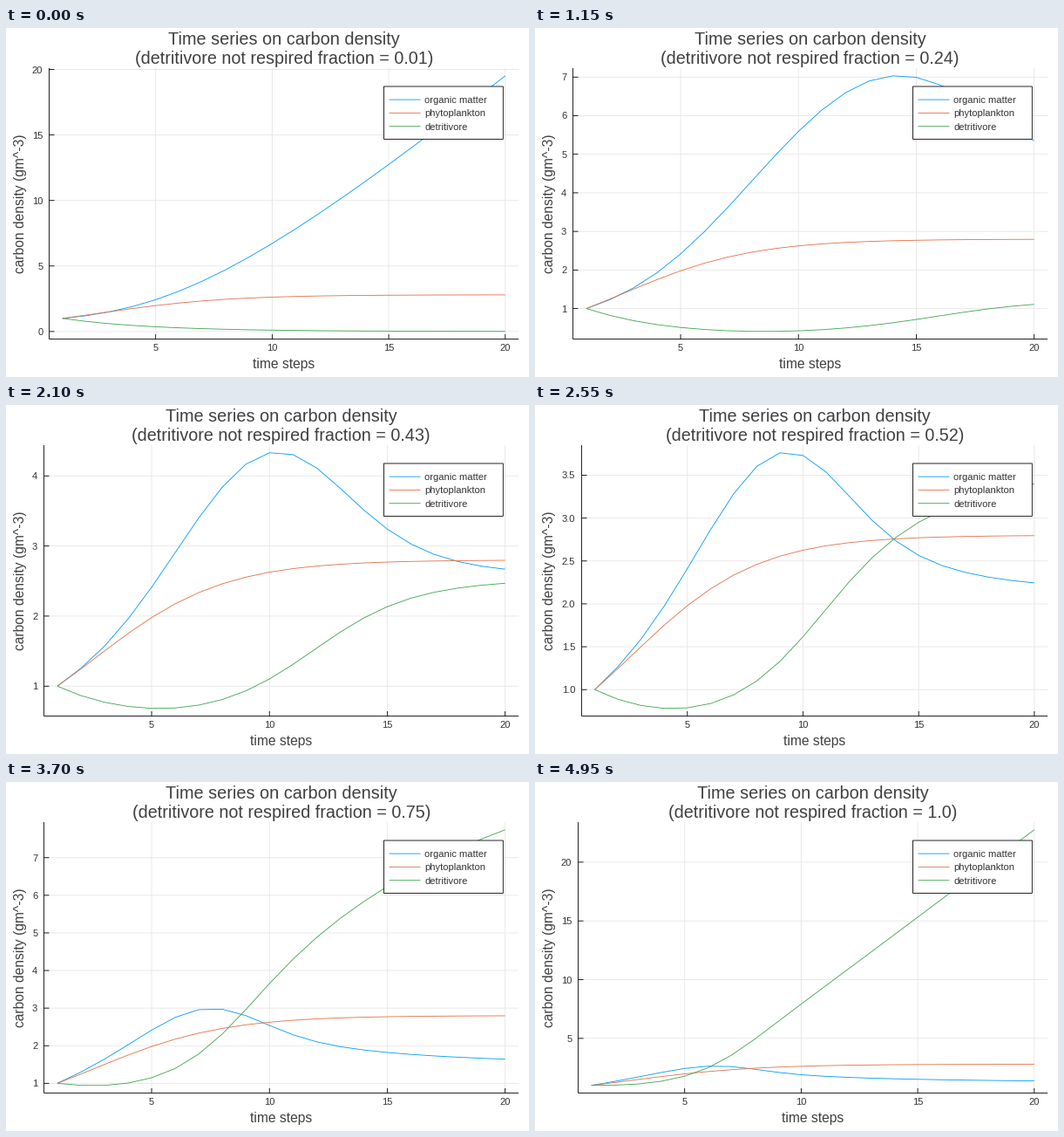
A matplotlib script for the animation above (5 s loop, 600 by 400 pixels).

```python
import numpy as np
import matplotlib
import matplotlib.pyplot as plt
from matplotlib.animation import FuncAnimation
from matplotlib.patches import Rectangle

matplotlib.rcParams["font.family"] = "Liberation Sans"

W, H, DPI = 600, 400, 100
FRAMES, INTERVAL = 100, 50
TOP, BOTTOM, RIGHT = 46, 356.5, 588
PAD = 0.03
PX = 72 / DPI
STROKE = 0.85 * PX

NAMES = ["organic matter", "phytoplankton", "detritivore"]
COLORS = ["#009afa", "#e36f47", "#3ea44e"]
INK, SOFT, GRID = "#333333", "#404040", "#e6e6e6"

# Carbon model
GROWTH, CAPACITY = 0.367, 2.8
LITTER, CROWDING = 0.177, 0.1245
FEEDING, ASSIMILATION, HANDLING = 0.398, 0.2355, 0.004
MORTALITY = 0.258

steps = np.arange(1, 21)
fractions = np.arange(1, FRAMES + 1) / 100


def rates(state):
    organic, phyto, detri = state
    contact = organic * detri / (1 + HANDLING * organic)
    gain = fractions * ASSIMILATION * contact
    respired = (1 - fractions) * FEEDING * contact
    supply = LITTER * phyto + CROWDING * phyto ** 2
    d_detri = gain - MORTALITY * detri
    return np.array([supply - respired - d_detri,
                     GROWTH * phyto * (1 - phyto / CAPACITY),
                     d_detri])


def simulate(substeps=20):
    """Integrate every fraction at once with Runge-Kutta."""
    h = 1 / substeps
    state = np.ones((3, FRAMES))
    out = [state]
    for _ in steps[1:]:
        for _ in range(substeps):
            k1 = rates(state)
            k2 = rates(state + h / 2 * k1)
            k3 = rates(state + h / 2 * k2)
            k4 = rates(state + h * k3)
            state = state + h / 6 * (k1 + 2 * k2 + 2 * k3 + k4)
        out.append(state)
    return np.array(out)


series = simulate()


def pick_ticks(lo, hi):
    """Weigh tick count, coverage and roundness of the step."""
    best, best_score = None, -1
    for step, nice in [(0.5, 0.9), (1, 1), (2, 0.7), (2.5, 0.5), (3, 0.2), (5, 0.9), (10, 1)]:
        ticks = np.arange(int(np.ceil(lo / step)), int(np.floor(hi / step)) + 1) * step
        n = len(ticks)
        if not 4 <= n <= 8:
            continue
        score = (1 - abs(n - 5) / 5) / 4 + 0.5 * (hi - lo) / ((n - 1) * step) + nice / 4
        if score > best_score:
            best, best_score = ticks, score
    return best


fig = plt.figure(figsize=(W / DPI, H / DPI), dpi=DPI, facecolor="white")
ax = fig.add_axes([0, 0, 1, 1])


def line(x, y, color, z):
    ax.plot(x, y, color=color, lw=STROKE, zorder=z, solid_capstyle="butt", snap=False)


def text(x, y, s, size, color=INK, ha="center", **kw):
    ax.text(x, y, s, fontsize=size * PX, color=color, ha=ha, va="baseline", zorder=8, **kw)


def draw_legend():
    ax.add_patch(Rectangle((433.5, 67), 136.8, 60.4, fc="white", ec="black",
                           lw=STROKE, zorder=6, snap=False))
    for k, (name, color) in enumerate(zip(NAMES, COLORS)):
        y = 82.1 + 15.3 * k
        line([439.5, 475.5], [y, y], color, 7)
        text(480.5, y + 4, name, 11.1, ha="left")


def draw(i):
    ax.cla()
    ax.set_xlim(0, W)
    ax.set_ylim(H, 0)
    ax.axis("off")

    data = series[:, :, i]
    margin = PAD * (data.max() - data.min())
    lo, hi = data.min() - margin, data.max() + margin
    ticks = pick_ticks(lo, hi)
    whole = np.allclose(ticks, np.round(ticks))
    labels = [f"{t:.0f}" if whole else f"{t:.1f}" for t in ticks]

    # The left edge makes room for the widest label.
    widest = max(0.556 * len(s) - 0.278 * s.count(".") for s in labels) * 11.1
    left = round(36.9 + 1.09 * widest) - 0.5
    mid = (left + RIGHT) / 2

    def to_x(t):
        return left + (RIGHT - left) * ((t - 1) / 19 + PAD) / (1 + 2 * PAD)

    def to_y(v):
        return BOTTOM - (BOTTOM - TOP) * (v - lo) / (hi - lo)

    for t in (5, 10, 15, 20):
        x = to_x(t)
        line([x, x], [TOP, BOTTOM], GRID, 1)
        line([x, x], [BOTTOM - 5.5, BOTTOM], "black", 3)
        text(x, 370.3, str(t), 11.1)
    for t, label in zip(ticks, labels):
        y = to_y(t)
        line([left, RIGHT], [y, y], GRID, 1)
        line([left, left + 6], [y, y], "black", 3)
        text(left - 7.2, y + 4, label, 11.1, ha="right")
    line([left, left], [TOP, BOTTOM], "black", 3)
    line([left, RIGHT], [BOTTOM, BOTTOM], "black", 3)

    for k, color in enumerate(COLORS):
        line(to_x(steps), to_y(data[:, k]), color, 4)
    draw_legend()

    text(mid, 19.3, "Time series on carbon density", 19.9, SOFT)
    text(mid, 41, f"(detritivore not respired fraction = {fractions[i]})", 19.8, SOFT)
    text(mid, 390, "time steps", 15.6, SOFT)
    text(21, 201, "carbon density (gm^-3)", 15.6, SOFT, rotation=90, rotation_mode="anchor")
    return []


anim = FuncAnimation(fig, draw, frames=FRAMES, interval=INTERVAL, init_func=lambda: [],
                     repeat=True, repeat_delay=0)
plt.show()
```
